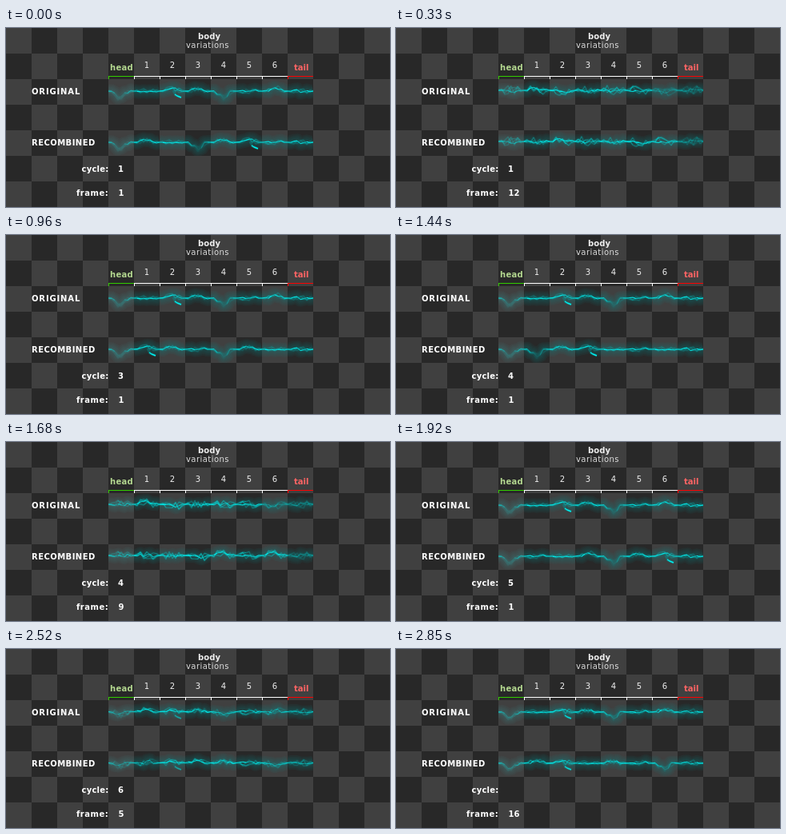
Write an HTML page with a canvas that moves like this. It is 480 px wide and 224 px high and loops after 2.88 s.

```html
<!DOCTYPE html>
<html lang="en">
<head>
<meta charset="utf-8">
<title>Lightning loop: recombined segments</title>
<style>
html, body { margin: 0; width: 480px; height: 224px; overflow: hidden; background: #282828; }
svg, canvas { position: absolute; left: 0; top: 0; }
text { font: 10px Verdana, "DejaVu Sans", sans-serif; white-space: pre; }
.b { font-weight: bold; }
</style>
</head>
<body>
<svg id="stage" width="480" height="224" viewBox="0 0 480 224"></svg>
<canvas id="bolts" width="480" height="224"></canvas>
<script>
const STEP = 30, FRAMES = 16, CELL = 32, LEFT = 128, TAIL = 7;
// Body variations used in each cycle
const ORDERS = ['314325', '546213', '235431', '432151', '516432', '621354'];
const TOTAL = FRAMES * ORDERS.length;

const stage = document.getElementById('stage');
const ctx = document.getElementById('bolts').getContext('2d');

function add(tag, attrs, content = '') {
  const el = document.createElementNS('http://www.w3.org/2000/svg', tag);
  for (const name in attrs) el.setAttribute(name, attrs[name]);
  el.textContent = content;
  stage.append(el);
  return el;
}
const rect = (x, y, width, height, fill) => add('rect', { x, y, width, height, fill });
const label = (x, y, str, fill, attrs) => add('text', { x, y, fill, ...attrs }, str);
const bold = (x, y, str, fill = '#fff', spacing = 0) =>
  label(x, y, str, fill, { class: 'b', 'letter-spacing': spacing });

for (let y = 0; y < 7; y++)
  for (let x = 0; x < 15; x++)
    rect(x * CELL, y * CELL, CELL, CELL, (x + y) % 2 ? '#282828' : '#404040');

for (let i = 0; i <= TAIL; i++) {
  const x = LEFT + i * CELL;
  const color = i === 0 ? '#33cc00' : i === TAIL ? '#ff0000' : '#fff';
  rect(x, 60, CELL, 1, color);
  rect(x, 60, 1, 4, color);
  if (i > 0 && i < TAIL) label(x + 16, 50, i, '#eee', { 'text-anchor': 'middle' });
}
bold(240, 14, 'body', '#eee', 0.1);
label(225, 25, 'variations', '#ddd', { 'letter-spacing': 0.45 });
bold(130, 53, 'head', '#b4d890', 0.3);
bold(360, 53, 'tail', '#ff6464');
bold(32, 83, 'ORIGINAL', '#fff', 0.85);
bold(32, 147, 'RECOMBINED', '#fff', 0.45);
bold(94.5, 180, 'cycle:', '#fff', 0.25);
bold(88, 210, 'frame:', '#fff', 0.5);
const cycleText = bold(140, 180, '');
const frameText = bold(140.5, 210, '');

// Main bend of a segment; positive sizes sag and dim the bolt
const restBend = {
  0: { at: 14, size: 8 }, 2: { at: 15, size: -4 }, 3: { at: 14, size: -3 },
  4: { at: 16, size: 8 }, 6: { at: 18, size: -4 }
};
const peakBend = { 1: { at: 13, size: -4 }, 2: { at: 20, size: 2 }, 6: { at: 14, size: 2 } };

const mix = (a, b, t) => a + (b - a) * t;
const hump = (x, at, width) => Math.exp(-(((x - at) / width) ** 2));
const bendAt = (bend, x) => bend ? bend.size * hump(x, bend.at, 7) : 0;

// Repeatable noise from -1 to 1
function noise(a, b, c) {
  const n = Math.sin(a * 12.99 + b * 78.23 + c * 37.72) * 43758.55;
  return (n - Math.floor(n)) * 2 - 1;
}
// 0 at the loop point, 1 around frames 9 to 13
function charge(frame) {
  const t = Math.min(1, frame / 8, (FRAMES - frame) / 4);
  return t * t * (3 - 2 * t);
}

// A jagged path with fixed ends, so that neighbours join
function strand(seg, id, frame) {
  const w = charge(frame), turn = 2 * Math.PI * frame / FRAMES, pts = [];
  const spread = id ? mix(3, 5, w) : 2;
  for (let x = 0; x <= CELL; x += 4) {
    const pin = Math.min(1, x / 8, (CELL - x) / 8);
    const jag = noise(seg, x, id) * Math.cos(turn) + noise(seg, x, id + 5) * Math.sin(turn);
    const bend = mix(bendAt(restBend[seg], x), bendAt(peakBend[seg], x), w);
    pts.push([x, 1 - w + pin * (bend + jag * spread)]);
  }
  return pts;
}
function trace(pts, width, color, alpha) {
  ctx.beginPath();
  for (const [x, y] of pts) ctx.lineTo(x, y);
  ctx.lineWidth = width;
  ctx.strokeStyle = color;
  ctx.globalAlpha = alpha;
  ctx.stroke();
}
// Strokes each piece with its own brightness
function spark(pts, seg, id, power, w) {
  const rest = restBend[seg];
  for (let i = 0; i < pts.length - 1; i++) {
    const x = pts[i][0] + 2;
    const sag = rest && rest.size > 0 ? 0.85 * hump(x, rest.at, 11) * (1 - w) : 0;
    const flicker = 0.75 + 0.25 * noise(seg, i, id + 9);
    trace(pts.slice(i, i + 2), 1.1, '#00f0f0', power * flicker * (1 - sag));
  }
}
function segment(seg, x, y, frame) {
  const w = charge(frame);
  const power = seg >= 6 ? mix(1, 0.4, w) : seg === 0 ? mix(0.8, 0.65, w) : 1;
  const main = strand(seg, 0, frame);
  const haze = seg === 0 ? '#3c9696' : '#009696';
  ctx.save();
  ctx.beginPath();
  ctx.rect(x, y - 14, CELL, CELL);
  ctx.clip();
  ctx.translate(x, y);
  ctx.lineJoin = 'round';

  for (let width = 18; width > 3; width -= 4) trace(main, width, haze, 0.075);
  for (let id = 1; id <= 3; id++) {
    const side = strand(seg, id, frame);
    trace(side, 3, haze, 0.1);
    spark(side, seg, id, power * mix(0.25, 0.45, w), w);
  }
  spark(main, seg, 0, power, w);

  // Falling branch of the second variation
  if (seg === 2) {
    trace([[17, 0], [20, 6], [27, 9]], 3, haze, 0.4 * (1 - w));
    trace([[19, 5], [22, 7], [27, 9]], 1.4, '#00f0f0', 1 - w);
  }
  ctx.restore();
}
function row(order, y, frame) {
  [0, ...order, TAIL].forEach((seg, i) => segment(Number(seg), LEFT + i * CELL, y, frame));
}

let shown = -1;
function draw(time) {
  const index = Math.floor(time / STEP) % TOTAL;
  if (index === shown) return;
  shown = index;
  const cycle = Math.floor(index / FRAMES), frame = index % FRAMES;
  cycleText.textContent = index === TOTAL - 1 ? '' : cycle + 1;
  frameText.textContent = frame + 1;
  ctx.clearRect(0, 0, 480, 224);
  row('123456', 78, frame);
  row(ORDERS[cycle], 142, frame);
}
const start = performance.now();
function tick() {
  draw(performance.now() - start);
  requestAnimationFrame(tick);
}
tick();
</script>
</body>
</html>
```
